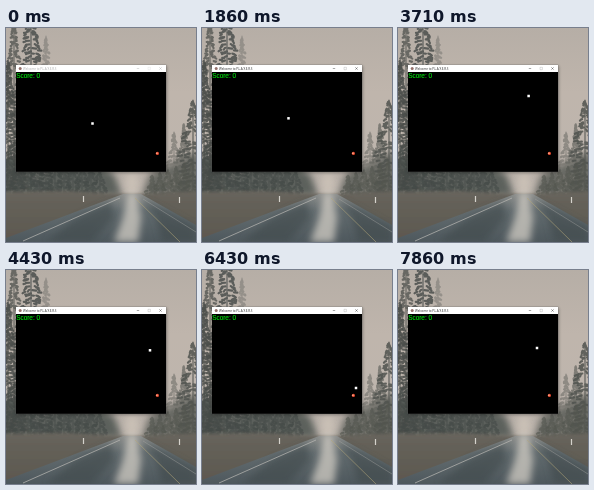
These frames come from a looping animation (190 px wide and 214 px high, 8 s). An HTML page:

```html
<!DOCTYPE html>
<html lang="en">
<head>
<meta charset="utf-8">
<title>Snake window</title>
<style>
  html, body { margin: 0; width: 100%; height: 100%; overflow: hidden; background: #b9b0a8; }
  svg { display: block; width: 100%; height: 100%; }
  .title { font: 3px "Open Sans", sans-serif; }
  .score { font: 6.4px "Liberation Sans", sans-serif; fill: #00d80c; stroke: #00d80c; stroke-width: .15; }
</style>
</head>
<body>
<svg viewBox="0 0 190 214" preserveAspectRatio="none">
  <defs>
    <linearGradient id="sky" x2="0" y2="1">
      <stop offset="0" stop-color="#b6aea6"/>
      <stop offset=".3" stop-color="#bfb5ac"/>
      <stop offset=".55" stop-color="#beb5ad"/>
      <stop offset="1" stop-color="#aaa49e"/>
    </linearGradient>
    <linearGradient id="road" x2="0" y2="1">
      <stop offset="0" stop-color="#8b8d8b"/>
      <stop offset=".35" stop-color="#636c6f"/>
      <stop offset="1" stop-color="#4e585d"/>
    </linearGradient>
    <linearGradient id="verge" x2="0" y2="1">
      <stop offset="0" stop-color="#67645c"/>
      <stop offset="1" stop-color="#5b564d"/>
    </linearGradient>
    <filter id="soft" x="-20%" y="-20%" width="140%" height="140%"><feGaussianBlur stdDeviation="1.8"/></filter>
    <filter id="haze" x="-40%" y="-40%" width="180%" height="180%"><feGaussianBlur stdDeviation="3.5"/></filter>
  </defs>

  <rect width="190" height="214" fill="url(#sky)"/>

  <!-- misty forest edge -->
  <path d="M-5 130H70L92 138L108 146L116 168H-5Z" fill="#5c605b" filter="url(#haze)"/>
  <path d="M195 122L176 130L158 140L144 146L136 168H195Z" fill="#686963" filter="url(#haze)"/>
  <g id="trees"></g>
  <ellipse cx="126" cy="156" rx="7" ry="11" fill="#cfc5ba" opacity=".8" filter="url(#haze)"/>

  <!-- verges and wet road -->
  <path d="M-5 164L60 163L118 166H136L195 163V219H-5Z" fill="url(#verge)" filter="url(#soft)"/>
  <path d="M117 166H135L190 197V214H0V210Z" fill="url(#road)"/>
  <path d="M105 173L70 190L40 214H86L108 190ZM139 172L150 190L156 214H190V199Z" fill="#3f494c" opacity=".6" filter="url(#haze)"/>
  <path d="M122 164H130L135 190L132 214H108L117 190Z" fill="#d2cdc5" opacity=".75" filter="url(#haze)"/>
  <path d="M114 170L17 213" stroke="#b9b8b4" stroke-width=".9" opacity=".8"/>
  <path d="M137 171L190 204" stroke="#a8a8a4" stroke-width=".5" opacity=".8"/>
  <path d="M129 170L174 214" stroke="#b3a67a" stroke-width=".8" opacity=".7"/>
  <path d="M77.5 168V174M173.5 169V175" stroke="#d5d2cc" stroke-width="1.2"/>

  <!-- game window -->
  <rect x="10" y="38" width="151" height="107" fill="#000" opacity=".3" filter="url(#soft)"/>
  <rect x="9.8" y="36.8" width="150.4" height="107.2" fill="#666"/>
  <rect x="10" y="37" width="150" height="7" fill="#fff"/>
  <rect x="10" y="44" width="150" height="99.8" fill="#000"/>
  <circle cx="14.2" cy="40.5" r="1.5" fill="#94706a"/>
  <g id="chrome">
    <text class="title" x="17" y="41.6">Welcome to P.L.A.Y.E.R.S</text>
    <g fill="none" stroke="currentColor">
      <path d="M130.8 40.5h2.4M153.3 39.3l2.4 2.4m0-2.4l-2.4 2.4" stroke-width=".4"/>
      <path d="M142 39.3h2.4v2.4h-2.4Z" stroke-width=".15"/>
    </g>
  </g>
  <text class="score" x="10.2" y="50">Score: 0</text>
  <circle cx="151.4" cy="125.4" r="1.6" fill="#e8492f"/>
  <circle cx="150.9" cy="125.3" r=".8" fill="#ffc0a0"/>
  <rect id="head" width="2.5" height="2.5" fill="#fff"/>
</svg>

<script>
const LOOP = 8000, STEPS = 56, ACTIVE_STEP = 7;
const head = document.getElementById('head');
const chrome = document.getElementById('chrome');
const trees = document.getElementById('trees');

// Each turn: game step, x, y of the head's centre.
const route = [
  [0, 86.5, 95.5], [12, 86.5, 95.5], [17.3, 86.5, 68], [22, 111.5, 68],
  [28.8, 144, 68], [31, 144, 80.3], [33, 144, 91.3], [40.5, 144, 133],
  [42.3, 154, 133], [45, 154, 118], [48, 154, 101], [52.2, 154, 78], [55, 139, 78]
];

let seed = 17;
const random = () => (seed = seed * 16807 % 2147483647) / 2147483647;

// A trunk with loose, drooping clumps of needles that widen downwards.
function pine(x, top, base, spread, color, opacity) {
  let d = '';
  for (let y = top; y < base; y += 1.5) {
    const reach = spread * Math.min(1, .12 + (y - top) / (base - top) * 1.6);
    for (const side of [-1, 1]) {
      const offset = side * reach * random() * .8, length = side * reach * (.15 + random() * .25);
      d += `M${x + offset} ${y + random() * 3}q${length / 2} 0 ${length} ${random() * 2}`;
    }
  }
  trees.insertAdjacentHTML('beforeend',
    `<g fill="none" stroke="${color}" stroke-linecap="round" opacity="${opacity}">
      <path d="M${x} ${top}V${base}" stroke-width="1.2"/><path d="${d}" stroke-width="2.2"/></g>`);
}

pine(40, 8, 150, 10, '#7d7b76', .6);
pine(25, -22, 160, 19, '#4b4f4d', .85);
pine(8, -4, 160, 13, '#555753', .8);
pine(2, 32, 165, 11, '#4a4d4a', .85);
pine(168, 104, 168, 9, '#7a7872', .7);
pine(178, 96, 168, 9, '#64655f', .7);
pine(187, 72, 168, 14, '#50534f', .85);
for (let x = 4; x < 100; x += 9) pine(x, 118 + x * .25, 166, 7, '#444a47', .6);
for (let x = 146; x < 190; x += 8) pine(x, 147 - (x - 146) * .35, 168, 6, '#53564f', .6);

function position(step) {
  const next = route.findIndex(turn => turn[0] >= step);
  if (next < 1) return route[0].slice(1);
  const [s0, x0, y0] = route[next - 1], [s1, x1, y1] = route[next];
  const k = (step - s0) / (s1 - s0);
  return [x0 + (x1 - x0) * k, y0 + (y1 - y0) * k];
}

function draw(now) {
  const step = Math.floor((now % LOOP) / LOOP * STEPS + .03) % STEPS;
  const [x, y] = position(step);
  head.setAttribute('x', x - 1.25);
  head.setAttribute('y', y - 1.25);
  const color = step < ACTIVE_STEP ? '#aaa' : '#222';
  chrome.setAttribute('fill', color);
  chrome.setAttribute('color', color);
  requestAnimationFrame(draw);
}
draw(0);
</script>
</body>
</html>
```
